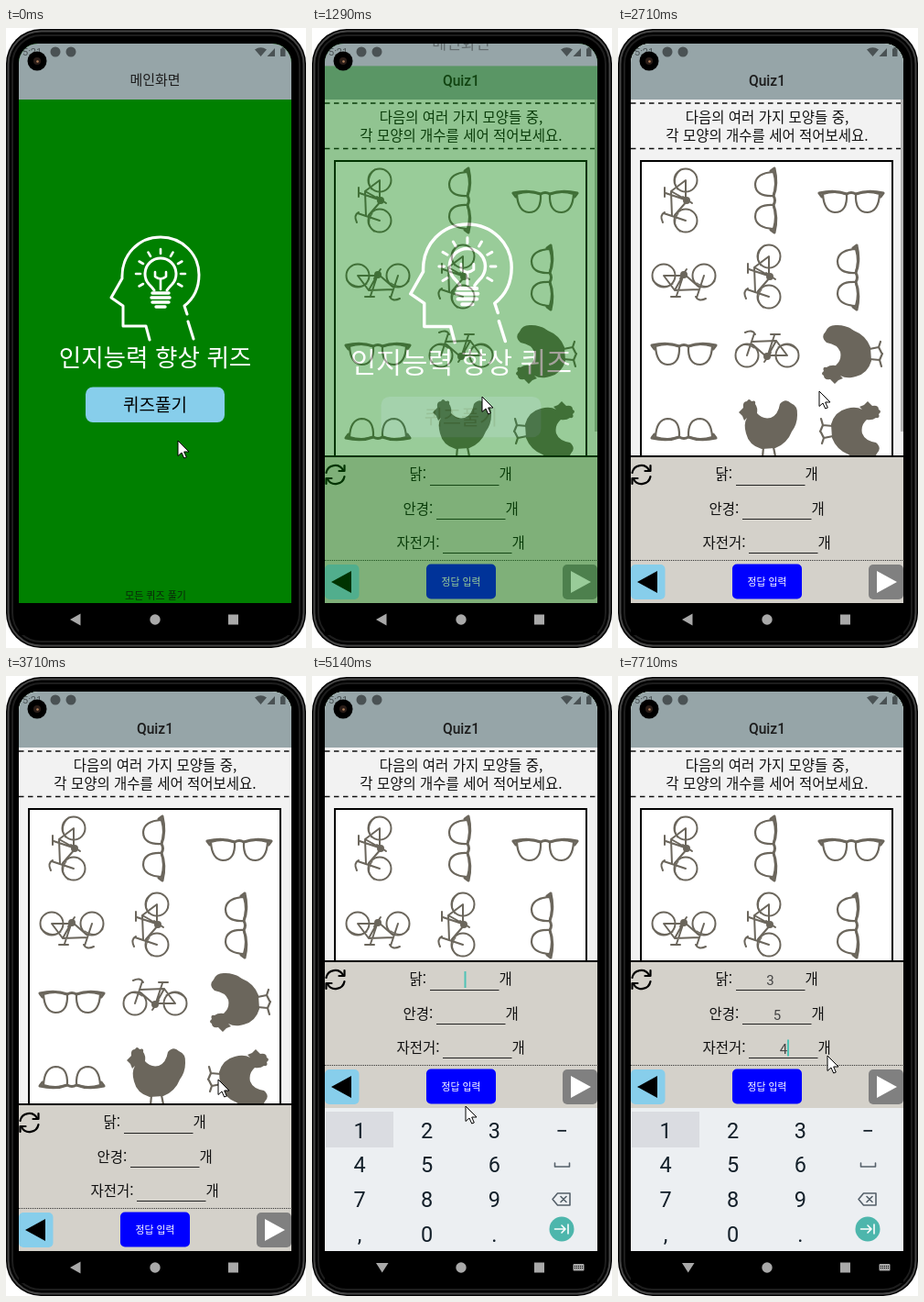
An HTML page that plays this animation: 328x676 px, repeating every 8000 ms.

```html
<!DOCTYPE html>
<html lang="ko">
<head>
<meta charset="utf-8">
<title>Quiz app</title>
<style>
  html, body { margin: 0; width: 100%; height: 100%; overflow: hidden; background: #fff; }
  svg { display: block; width: 328px; height: 676px; }
  text { font-family: "Noto Sans CJK KR", "Noto Sans CJK", "Noto Sans", sans-serif; }
  .mid { text-anchor: middle; }
  .latin text, text.latin { font-family: Roboto, sans-serif; text-anchor: middle; }
  .line { fill: none; stroke-linecap: round; stroke-linejoin: round; }
  .field { stroke: #222; stroke-width: 1; }
  #home { transform-origin: 163px 322px; }
</style>
</head>
<body>
<svg viewBox="0 0 328 676">
  <defs>
    <clipPath id="screen"><rect x="14" y="17" width="298" height="645" rx="21"/></clipPath>
    <clipPath id="sheet"><rect id="sheetBox" x="14" y="78" width="298" height="389"/></clipPath>

    <g id="bike" class="line" stroke="#6b665c" stroke-width="2">
      <circle cx="-22" cy="5" r="12.5"/>
      <circle cx="22" cy="5" r="12.5"/>
      <path d="M-22 5L-14-19M-24-20Q-16-24-13-18M-17-10L10-11M-16-7L0 7L10-11L22 5H0M0 7L8-17M4-18H14M-3 12L4 2"/>
      <circle cx="0" cy="6" r="3" fill="#6b665c"/>
      <path d="M-34-1Q-26-11-14-3M12-4Q24-11 34 0" stroke-width="1.2"/>
    </g>

    <g id="glasses" class="line" stroke="#6b665c" stroke-width="2.2">
      <path d="M-31-8Q-18-12-5-8Q-4 12-18 12Q-30 11-31-8Z"/>
      <path d="M31-8Q18-12 5-8Q4 12 18 12Q30 11 31-8Z"/>
      <path d="M-35-9Q-18-13-5-8Q0-11 5-8Q18-13 35-9M-35-9L-32-5M35-9L32-5" stroke-width="3"/>
    </g>

    <g id="hen" fill="#6b665c">
      <path d="M-31-17L-26-22Q-27-29-22-29Q-20-33-17-29Q-12-31-13-26Q-10-22-11-16Q-5-9 4-11Q12-14 14-26Q20-33 26-27Q34-24 33-14Q33-4 27 4Q22 17 9 22L-6 23Q-20 19-23 6Q-26-4-22-11L-25-8L-27-13Z"/>
      <path class="line" d="M-4 21L-5 32L-12 34M-5 32L2 35M7 21L9 31L3 34M9 31L15 33" stroke="#6b665c" stroke-width="2.2"/>
    </g>
  </defs>

  <rect x="0" y="1" width="328" height="675" rx="38"/>
  <rect x="2.5" y="3.5" width="323" height="670" rx="36" fill="none" stroke="#454545" stroke-width="2"/>
  <rect x="7" y="8" width="314" height="661" rx="31" fill="none" stroke="#1d1d1d" stroke-width="2"/>

  <g clip-path="url(#screen)">
    <g id="home">
      <rect x="14" y="17" width="298" height="610" fill="green"/>
      <rect x="14" y="17" width="298" height="61" fill="#96a5a8"/>
      <text class="mid" x="163" y="62" font-size="15" fill="#1c1c1c">메인화면</text>
      <g class="line" stroke="#fff" stroke-width="3">
        <path d="M157 340L153 325H128V303L115 294L127 273C126 247 145 228 169 228C193 228 211 247 211 269C211 285 204 296 195 303L198 312M199 320L205 339"/>
        <path d="M162 286Q160 283 156 279A17 17 0 1 1 182 279Q178 283 176 286"/>
        <path d="M163 266V271Q169 276 175 271V266M169 274V285" stroke-width="2.6"/>
        <path d="M160 289H178M159 294H179M160 299H178M164 304H174" stroke-width="3.4"/>
        <path id="rays" stroke-width="2.6"/>
      </g>
      <text class="mid" x="163" y="369" font-size="26.6" fill="#fff">인지능력 향상 퀴즈</text>
      <g id="start">
        <rect x="87" y="391.5" width="152" height="38.5" rx="8" fill="skyblue"/>
        <text class="mid" x="163" y="418" font-size="19">퀴즈풀기</text>
      </g>
      <text class="mid" x="163.5" y="623" font-size="11" fill="#0a260a">모든 퀴즈 풀기</text>
    </g>

    <g id="quiz">
      <rect x="14" y="17" width="298" height="610" fill="#f2f2f2"/>
      <rect x="14" y="17" width="298" height="61" fill="#96a5a8"/>
      <text class="latin" x="163" y="62.5" font-size="15.6" font-weight="500" fill="#1c1c1c">Quiz1</text>
      <path d="M14 82H312M14 131.5H312" stroke="#111" stroke-width="1.6" stroke-dasharray="5.5 4.5"/>
      <g class="mid" font-size="15.5" fill="#111">
        <text x="163" y="103">다음의 여러 가지 모양들 중,</text>
        <text x="163" y="123">각 모양의 개수를 세어 적어보세요.</text>
      </g>
      <g clip-path="url(#sheet)">
        <rect x="25" y="145" width="275" height="500" fill="#fff" stroke="#000" stroke-width="2"/>
        <g id="shapes"></g>
        <rect id="bar" x="309" y="78" width="3" height="362" fill="#b5b5b5"/>
      </g>

      <g id="panel">
        <rect x="14" y="466" width="298" height="161" fill="#d4d1ca"/>
        <path d="M14 467H312" stroke="#000" stroke-width="2"/>
        <g class="line" stroke="#000" stroke-width="2.2">
          <path d="M15.5 485A10 10 0 0 1 34 482M35.5 489A10 10 0 0 1 17 492"/>
          <path d="M35.5 477V483H29.5M15.5 497V491H21.5"/>
        </g>
        <g font-size="15.5" fill="#111">
          <text x="106.5" y="492">닭:</text><text x="204.5" y="492">개</text>
          <text x="99.5" y="529.5">안경:</text><text x="211.5" y="529.5">개</text>
          <text x="92.5" y="567">자전거:</text><text x="218.5" y="567">개</text>
        </g>
        <path class="field" d="M129 498.5H204.5M136 535.5H211.5M143 572.5H218.5"/>
        <g class="latin" font-size="15" fill="#444">
          <text id="a0" x="166.5" y="493">3</text>
          <text id="a1" x="174" y="530.5">5</text>
          <text id="a2" x="181" y="567.5">4</text>
        </g>
        <rect id="caret" width="2" height="18" fill="#4fc3b5"/>
        <path d="M14 580.5H312" stroke="#333" stroke-dasharray="1 1"/>
        <rect x="14" y="585" width="37.5" height="38" rx="5" fill="skyblue"/>
        <path d="M21 604L43 592V616Z"/>
        <rect x="125" y="584.5" width="76" height="38" rx="5" fill="#00f"/>
        <text class="mid" x="163" y="608" font-size="10.8" fill="#fff">정답 입력</text>
        <rect x="274" y="585" width="38" height="38" rx="5" fill="gray"/>
        <path d="M305 604L283 592V616Z" fill="#fff"/>
      </g>
    </g>

    <g id="keys">
      <rect x="14" y="471" width="298" height="156" fill="#eceff2"/>
      <rect x="15" y="475" width="74" height="39" fill="#dadce1"/>
      <g id="digits" class="latin" font-size="23.5" fill="#14202a"></g>
      <g class="line" stroke="#55606a" stroke-width="1.6">
        <path d="M265.500 531V535H281.500V531"/>
        <path d="M263 570.5L268.500 564H282V577H268.500ZM272 567.500L278 573.500M278 567.500L272 573.500"/>
      </g>
      <circle cx="273" cy="603" r="13.5" fill="#4db6ac"/>
      <path class="line" d="M265.500 603H277M273 599L277 603L273 607M280 598V608" stroke="#fff" stroke-width="1.6"/>
    </g>

    <g fill="#4a5254">
      <text x="18" y="30" font-size="11" style="font-family:Roboto,sans-serif">5:21</text>
      <circle cx="54" cy="26" r="5.500"/>
      <circle cx="71" cy="26" r="5.500"/>
      <path d="M272 23.500Q278.500 19 285 23.500L278.500 31ZM285.500 31H294V22Z"/>
      <path d="M300 22.500H301.500V21H304V22.500H305.500V31H300Z"/>
    </g>
  </g>
  <circle cx="34" cy="36" r="10.5"/>
  <circle cx="34" cy="36" r="4" fill="#2a1d18"/>
  <circle cx="34.500" cy="36.500" r="1.3" fill="#b0805c"/>

  <rect x="14" y="627" width="298" height="35"/>
  <g fill="#a9a9a9">
    <path id="back"/>
    <circle cx="163" cy="645" r="5.7"/>
    <rect x="243" y="639.500" width="11" height="11"/>
    <g id="kbIcon">
      <rect x="285.500" y="641" width="12" height="7.500" rx="1"/>
      <path d="M287 643.500H296M287 645.500H296" stroke="#000" stroke-dasharray="1 1"/>
    </g>
  </g>
  <path id="cursor" d="M0 0V16.500L4 13L6.700 19L9.300 18L6.700 12H12Z" fill="#fff" stroke="#000" stroke-linejoin="round"/>
</svg>

<script>
const LOOP = 8000, FPS = 7;
const $ = id => document.getElementById(id);
const show = (id, on) => $(id).setAttribute('visibility', on ? 'visible' : 'hidden');
const move = (id, x, y) => $(id).setAttribute('transform', `translate(${x} ${y})`);

// Rays every 30 degrees around the bulb
let rays = '';
for (let deg = -30; deg <= 210; deg += 30) {
  const a = deg * Math.PI / 180, c = Math.cos(a), s = Math.sin(a);
  rays += `M${169 + 22 * c} ${268 - 22 * s}L${169 + 27 * c} ${268 - 27 * s}`;
}
$('rays').setAttribute('d', rays);

// Shape, centre, turn
$('shapes').innerHTML = [
  ['bike', 69, 188, -90], ['glasses', 162, 188, 90], ['glasses', 255, 189, 0],
  ['bike', 72, 275, 180], ['bike', 160, 271, -90], ['glasses', 252, 272, 90],
  ['glasses', 72, 355, 0], ['bike', 163, 352, 0], ['hen', 254, 357, -90],
  ['glasses', 72, 438, 180], ['hen', 163, 436, 0], ['hen', 256, 438, 90]
].map(([id, x, y, r]) =>
  `<use href="#${id}" transform="translate(${x} ${y}) rotate(${r})"/>`).join('');

$('digits').innerHTML = ['123−', '456', '789', ',0.'].map((row, j) =>
  [...row].map((ch, i) =>
    `<text x="${52 + 73.7 * i}" y="${503.500 + 37.7 * j}">${ch}</text>`).join('')).join('');

// Cursor stops: step, x, y
const path = [
  [0, 188, 450], [1, 176, 385], [2, 223, 304], [3, 223, 304], [6, 187, 402],
  [8, 186, 402], [12, 186, 402], [19, 220, 396], [26, 232, 440], [32, 167, 497],
  [33, 167, 497], [36, 168, 469], [39, 229, 385], [41, 190, 372], [44, 186, 393],
  [46, 186, 393], [50, 182, 408], [53, 229, 414], [56, 229, 414]
];

function cursorAt(k) {
  const i = path.findIndex(p => p[0] > k);
  const [k0, x0, y0] = path[i - 1], [k1, x1, y1] = path[i];
  const u = (k - k0) / (k1 - k0);
  return [Math.round(x0 + (x1 - x0) * u), Math.round(y0 + (y1 - y0) * u)];
}

function caretAt(k) {
  if (k < 38) return [166.5, 478];
  if (k < 41) return [171.5, 478];
  if (k < 44) return [173, 515.5];
  if (k < 50) return [178.5, 515.5];
  return [k < 54 ? 180 : 185, 552.5];
}

function draw(k) {
  const scale = k < 8 ? 1 : k === 8 ? 1.04 : 1.15;
  $('home').style.transform = `scale(${scale})`;
  $('start').setAttribute('opacity', k < 7 ? 1 : k === 7 ? 0.6 : 0.2);
  $('quiz').setAttribute('opacity', k < 9 ? 0 : k === 9 ? 0.6 : 1);
  show('bar', k < 21);

  const lift = k >= 34 ? 156 : 0;
  move('panel', 0, -lift);
  $('sheetBox').setAttribute('height', 389 - lift);
  show('keys', lift);
  move('keys', 0, k === 34 ? 60 : 0);
  show('kbIcon', k >= 33);
  $('back').setAttribute('d', lift ? 'M70 640H83.500L76.700 650.500Z' : 'M70 645L81.500 638.500V651.500Z');

  [38, 44, 54].forEach((from, i) => show('a' + i, k >= from));
  show('caret', k >= 33);
  move('caret', ...caretAt(k));
  move('cursor', ...cursorAt(k));
}

const start = performance.now();
let last = -1;
function tick() {
  const t = (performance.now() - start) % LOOP;
  const k = Math.floor((t + 5) * FPS / 1000) % 56;
  if (k !== last) draw(last = k);
  requestAnimationFrame(tick);
}
tick();
</script>
</body>
</html>
```
